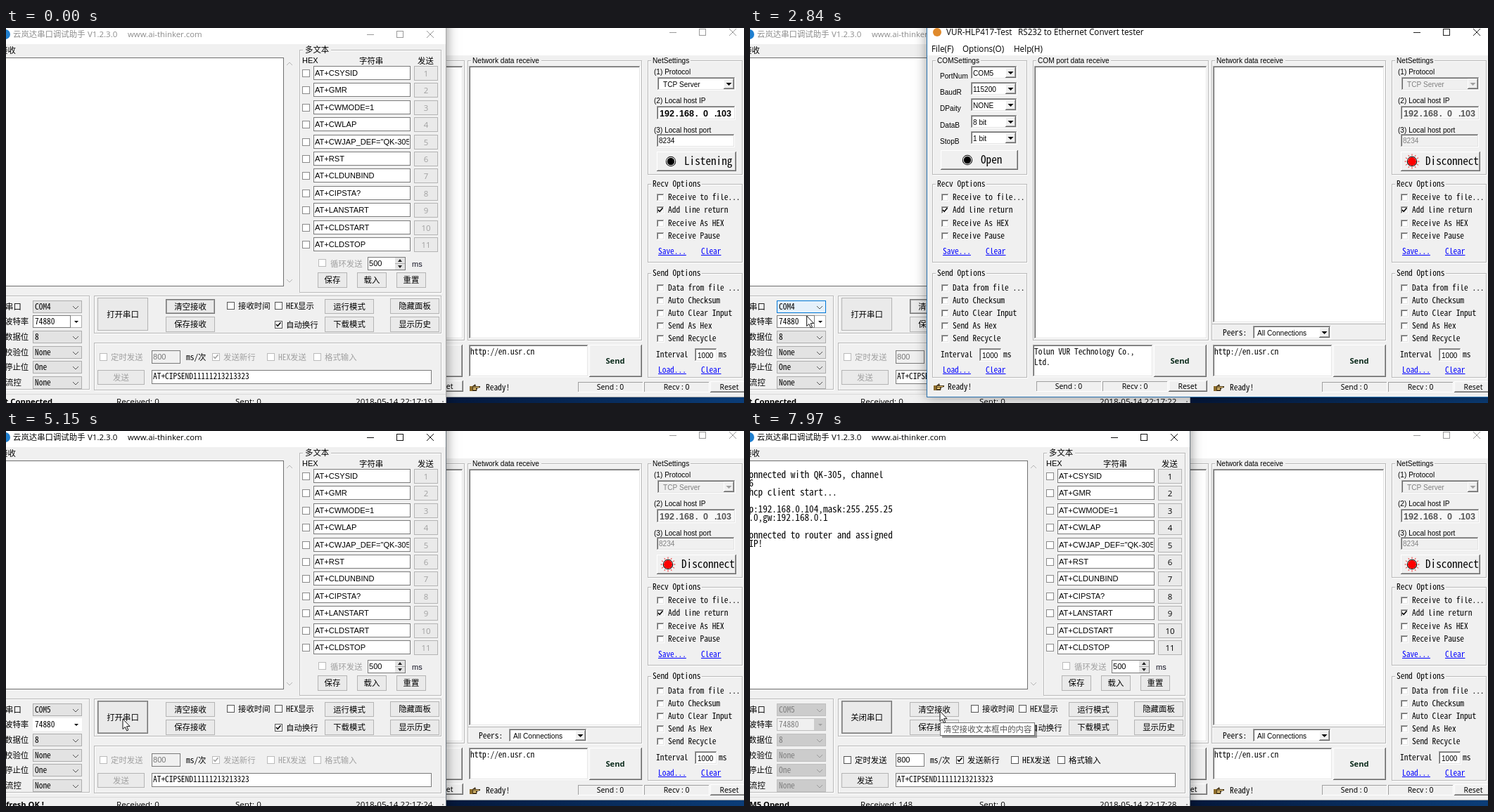
An HTML page with a canvas for the animation above (8000 ms loop, 1049 px wide and 534 px high).

```html
<!DOCTYPE html>
<html lang="en">
<head>
<meta charset="utf-8">
<title>Serial and network test</title>
<style>
html, body { margin: 0; width: 100%; height: 100%; overflow: hidden; background: #f0f0f0; }
canvas { display: block; }
</style>
</head>
<body>
<canvas id="stage" width="1049" height="534"></canvas>
<script>
const ctx = document.getElementById('stage').getContext('2d');
const LOOP = 8000, GRAY = '#f0f0f0', DIM = '#a0a0a0', BLUE = '#0078d7';
const F = {
  ui: '"Open Sans", "Noto Sans CJK SC", sans-serif',
  sans: '"Liberation Sans", Arial, sans-serif',
  noto: '"Noto Sans", sans-serif',
  mono: '"Noto Sans Mono CJK SC", "Noto Sans CJK SC", monospace'
};

// Basic drawing
function rect(x, y, w, h, c) { ctx.fillStyle = c; ctx.fillRect(x, y, w, h); }

function frame(x, y, w, h, c) {
  ctx.strokeStyle = c; ctx.lineWidth = 1;
  ctx.strokeRect(x + .5, y + .5, w - 1, h - 1);
}

function text(s, x, y, font = 'mono', size = 11.4, color = '#000', align = 'left', weight = '') {
  ctx.font = `${weight} ${size}px ${F[font]}`;
  ctx.fillStyle = color; ctx.textAlign = align;
  ctx.fillText(s, x, y + size * .36);
}
const sans = (s, x, y, c, size = 10.1) => text(s, x, y, 'sans', size, c);

function line(points, color, width = 1) {
  ctx.beginPath();
  points.forEach(([x, y], i) => i ? ctx.lineTo(x, y) : ctx.moveTo(x, y));
  ctx.strokeStyle = color; ctx.lineWidth = width; ctx.stroke();
}

function poly(points, color) {
  ctx.beginPath();
  points.forEach(([x, y]) => ctx.lineTo(x, y));
  ctx.closePath(); ctx.fillStyle = color; ctx.fill();
}

function disc(x, y, r, color) {
  ctx.beginPath(); ctx.arc(x, y, r, 0, 7); ctx.fillStyle = color; ctx.fill();
}

function bevel(x, y, w, h, fill, light, dark) {
  rect(x, y, w, h, fill);
  rect(x, y, w, 1, light); rect(x, y, 1, h, light);
  rect(x, y + h - 1, w, 1, dark); rect(x + w - 1, y, 1, h, dark);
}
function sunk(x, y, w, h, fill = '#fff') {
  bevel(x, y, w, h, fill, '#a0a0a0', '#fff');
  bevel(x + 1, y + 1, w - 2, h - 2, fill, '#696969', '#e3e3e3');
}
function raised(x, y, w, h) {
  bevel(x, y, w, h, GRAY, '#fff', '#696969');
  rect(x + 1, y + h - 2, w - 2, 1, '#a0a0a0');
  rect(x + w - 2, y + 1, 1, h - 2, '#a0a0a0');
}

function group(x, y, w, h, label, font = 'mono', size = 11.4, gap = 72) {
  frame(x + 1, y + 1, w, h, '#fff');
  frame(x, y, w, h, '#b8b8b8');
  if (!label) return;
  rect(x + 5, y - 1, gap, 4, GRAY);
  text(label, x + 7, y, font, size);
}

function tick(x, y, c) { line([[x + 2, y + 5], [x + 4.2, y + 7.3], [x + 8.5, y + 2.3]], c, 1.6); }

function captions(xs, y, c) {
  const [a, b, d] = xs;
  line([[a, y + .5], [a + 10, y + .5]], c);
  frame(b, y - 5, 10, 10, c);
  line([[d, y - 5], [d + 10, y + 5]], c);
  line([[d + 10, y - 5], [d, y + 5]], c);
}

// Network test window
function drop(x, y, w, h, label, off, marked) {
  sunk(x, y, w, h, off ? GRAY : '#fff');
  raised(x + w - 17, y + 2, 15, h - 4);
  const ax = x + w - 9.5, ay = y + h / 2 - 1.5;
  poly([[ax - 4, ay], [ax + 4, ay], [ax, ay + 4]], off ? DIM : '#000');
  if (marked) rect(x + 2, y + 2, w - 20, h - 4, BLUE);
  return marked ? '#fff' : off ? '#808080' : '#000';
}

function classicCheck(x, y, label, on) {
  sunk(x, y - 5, 11, 11);
  if (on) tick(x, y - 5, '#000');
  text(label, x + 16, y);
}

function link(s, x, y) {
  text(s, x, y, 'mono', 11.4, '#00f');
  rect(x, y + 5, s.length * 5.7, 1, '#00f');
}

function options(dx) {
  group(259 + dx, 222, 135, 112, 'Recv Options');
  ['Receive to file...', 'Add line return', 'Receive As HEX', 'Receive Pause']
    .forEach((s, i) => classicCheck(272 + dx, 241 + i * 18.6 | 0, s, i === 1));
  link('Save...', 274 + dx, 318); link('Clear', 335 + dx, 318);
  group(259 + dx, 349, 135, 149, 'Send Options');
  ['Data from file ...', 'Auto Checksum', 'Auto Clear Input', 'Send As Hex', 'Send Recycle']
    .forEach((s, i) => classicCheck(272 + dx, 370 + i * 18.1 | 0, s));
  text('Interval', 271 + dx, 465);
  sunk(326 + dx, 456, 32, 19); sans('1000', 330 + dx, 466);
  text('ms', 360 + dx, 465);
  link('Load...', 274 + dx, 487); link('Clear', 335 + dx, 487);
}

function hand(x, y) {
  rect(x, y - 2, 4, 7, '#8a6a2a');
  poly([[x + 4, y - 2], [x + 8, y - 5], [x + 9, y - 2], [x + 15, y - 2], [x + 15, y], [x + 11, y + 1], [x + 10, y + 5], [x + 4, y + 5]], '#4a3a20');
  rect(x + 5, y - 1, 8, 1, '#f6d27a');
  rect(x + 5, y + 1, 4, 2, '#f6d27a');
}

function footer(x, px, y, status) {
  hand(x, y + 1);
  text(status, x + (px > 700 ? 23 : 20), y + 1);
  ['Send : 0', 'Recv : 0'].forEach((s, i) => {
    bevel(px + i * 94, y - 7, 93, 15, GRAY, '#a0a0a0', '#fff');
    text(s, px + i * 94 + 46, y, 'noto', 10.4, '#000', 'center');
  });
  raised(px + 188, y - 8, 55, 16);
  text('Reset', px + 215, y, 'noto', 10.4, '#000', 'center');
}

function sendBox(x, w, lines) {
  sunk(x, 451, w, 46);
  lines.forEach((s, i) => text(s, x + 2, 461 + i * 15));
  raised(x + w + 1, 451, 75, 46);
  text('Send', x + w + 38, 474, 'noto', 11.2, '#0c2b1c', 'center', 'bold');
}

function lamp(x, y, on) {
  if (on) {
    for (let i = 0; i < 12; i++) {
      const a = i * Math.PI / 6, c = Math.cos(a), s = Math.sin(a);
      line([[x + 8 * c, y + 8 * s], [x + 10.5 * c, y + 10.5 * s]], '#e33');
    }
  }
  disc(x, y, 7.2, '#000'); disc(x, y, 6.2, '#fff'); disc(x, y, on ? 6 : 5.2, on ? '#f00' : '#000');
}

function netSettings(s) {
  const off = s.on, c = off ? '#808080' : '#000';
  group(912, 46, 135, 163, 'NetSettings', 'sans', 10.1, 56);
  sans('(1) Protocol', 921, 62);
  sans('TCP Server', 934, 80, drop(926, 70, 111, 19, '', off, s.front && !off));
  sans('(2) Local host IP', 921, 103);
  sunk(925, 111, 112, 20, off ? '#f7f7f7' : '#fff');
  [['192', 929], ['.', 952], ['168', 957], ['.', 980], ['0', 991], ['.', 1007], ['103', 1010]]
    .forEach(([v, x]) => text(v, x, 121.5, 'sans', 12.6, off ? '#555' : '#000', 'left', 'bold'));
  sans('(3) Local host port', 921, 145);
  sunk(925, 151, 111, 19, off ? GRAY : '#fff');
  sans('8234', 928, 160.5, c);
  const p = s.pressed ? 1 : 0;
  if (p) sunk(925, 176, 113, 28, GRAY); else raised(925, 176, 113, 28);
  lamp(off ? 941 : 945 + p, 190 + p, off);
  text(off ? 'Disconnect' : 'Listening', off ? 960 : 964 + p, 190 + p, 'mono', 15.2);
}

function netWindow(s) {
  const ink = s.front ? '#000' : DIM;
  ctx.save();
  if (s.front) { ctx.shadowColor = 'rgba(0,0,0,.4)'; ctx.shadowBlur = 16; }
  rect(251, -20, 830, 546, s.front ? '#2a73b0' : '#9aa0a6');
  ctx.restore();
  rect(252, 0, 830, 525, GRAY);
  rect(252, 0, 830, 39, '#fff');
  disc(266, 6, 6, '#e08a2c');
  text('VUR-HLP417-Test', 279, 6, 'ui', 11.7, ink);
  text('RS232 to Ethernet Convert tester', 381, 6, 'ui', 11.7, ink);
  captions([943, 985, 1028], 6, s.front ? '#222' : '#999');
  text('File(F)', 258, 30, 'ui', 11.7);
  text('Options(O)', 302, 30, 'ui', 11.7);
  text('Help(H)', 375, 30, 'ui', 11.7);

  group(259, 46, 135, 163, 'COMSettings', 'sans', 10.1, 64);
  [['PortNum', 'COM5'], ['BaudR', '115200'], ['DPaity', 'NONE'], ['DataB', '8 bit'], ['StopB', '1 bit']]
    .forEach(([label, value], i) => {
      const y = 64 + i * 23.4 | 0;
      sans(label, 270, y + 4);
      sans(value, 317, y, drop(314, y - 10, 66, 19));
    });
  raised(271, 174, 110, 28);
  lamp(309, 188); text('Open', 328, 188, 'mono', 15.2);

  group(402, 46, 250, 399, 'COM port data receive', 'sans', 10.1, 106);
  sunk(404, 54, 246, 389);
  group(656, 46, 248, 399, 'Network data receive', 'sans', 10.1, 100);
  sunk(658, 54, 244, s.on ? 366 : 389);
  if (s.on) {
    rect(656, 421, 248, 1, '#b8b8b8');
    text('Peers:', 672, 434);
    sans('All Connections', 721, 434, drop(715, 424, 111, 19));
  }
  netSettings(s);
  options(0); options(653);
  sendBox(402, 171, ['Tolun VUR Technology Co.,', 'Ltd.']);
  sendBox(658, 170, ['http://en.usr.cn']);
  footer(261, 407, 510, s.status);
  footer(659, 813, 511, s.status);
}

// Serial window
function btn(x, y, w, h, label, o = {}) {
  rect(x, y, w, h, '#eaeaea');
  frame(x, y, w, h, o.focus ? '#767676' : '#b4b4b4');
  if (o.focus) frame(x + 1, y + 1, w - 2, h - 2, '#a8a8a8');
  text(label, x + w / 2, y + h / 2, o.font || 'mono', 11.4, o.dim ? DIM : '#000', 'center');
}

function check(x, y, label, on, dim) {
  rect(x, y - 5, 11, 11, '#fff');
  frame(x, y - 5, 11, 11, dim ? '#bbb' : '#555');
  if (on) tick(x, y - 5, dim ? DIM : '#000');
  if (label) text(label, x + 16, y + .5, 'mono', 11.4, dim ? DIM : '#000');
}

function chevron(x, y, c, dir = 1) { line([[x - 4, y - 2 * dir], [x, y + 2 * dir], [x + 4, y - 2 * dir]], c); }

function field(x, y, w, h, s, font, size, fill = '#fff', color = '#000') {
  rect(x, y, w, h, fill); frame(x, y, w, h, '#7a7a7a');
  ctx.save();
  ctx.beginPath(); ctx.rect(x, y, w - 2, h); ctx.clip();
  text(s, x + 2, y + h / 2 - (font === 'mono' ? 1.5 : 0), font, size, color);
  ctx.restore();
}

function portCombos(s) {
  const labels = ['串口', '波特率', '数据位', '校验位', '停止位', '流控'];
  [s.port, '74880', '8', 'None', 'One', 'None'].forEach((v, i) => {
    const y = 397 + i * 21.7 | 0, edit = i === 1, hot = i === 0 && s.comHot;
    text(labels[i], i % 5 ? -2 : -1, y - .5);
    const fill = s.open ? '#ccc' : hot ? '#e5f1fb' : edit ? '#fff' : '#e3e3e3';
    rect(38, y - 9, 70, 18, fill);
    if (edit && s.open) rect(39, y - 8, 52, 16, GRAY);
    if (!edit || !s.flatBaud || s.open) frame(38, y - 9, 70, 18, s.open ? '#bfbfbf' : hot ? BLUE : '#adadad');
    if (edit && !s.flatBaud) { rect(91, y - 9, 1, 18, '#adadad'); frame(38, y - 9, 54, 18, '#7a7a7a'); }
    if (edit) poly([[97, y - 1], [103, y - 1], [100, y + 2]], s.open ? DIM : '#000');
    else chevron(99, y + 1, s.open ? '#999' : '#555');
    text(v, 41, y, 'mono', 11.4, s.open ? '#7d7d7d' : '#000');
  });
  if (!s.list) return;
  rect(38, 407, 70, 29, '#fff'); frame(38, 407, 70, 29, BLUE);
  const pick = s.cursor[1] > 420 ? 1 : 0;
  rect(39, 408 + pick * 14, 68, 13, BLUE);
  ['COM4', 'COM5'].forEach((v, i) => text(v, 41, 414 + i * 14, 'mono', 11.4, i === pick ? '#fff' : '#000'));
}

function multiText(s) {
  group(417, 31, 202, 346);
  rect(422, 29, 40, 5, GRAY);
  text('多文本', 425, 31);
  sans('HEX', 421, 46, '#000', 11);
  text('字符串', 502, 46.5); text('发送', 585, 46.5);
  ['CSYSID', 'GMR', 'CWMODE=1', 'CWLAP', 'CWJAP_DEF="QK-305"', 'RST', 'CLDUNBIND', 'CIPSTA?', 'LANSTART', 'CLDSTART', 'CLDSTOP']
    .forEach((cmd, i) => {
      const y = Math.round(64 + i * 24.4);
      rect(421, y - 5, 11, 11, '#fff'); frame(421, y - 5, 11, 11, '#8a8a8a');
      field(437, y - 10, 138, 20, 'AT+' + cmd, 'sans', 11.1);
      btn(580, y - 10, 34, 21, i + 1, { font: 'ui', dim: !s.open });
    });
  check(444, 334, '', false, true);
  text('循环发送', 461, 336, 'mono', 11.4, DIM);
  field(514, 326, 54, 19, '500', 'sans', 11.1);
  rect(553, 327, 14, 17, '#e3e3e3');
  rect(553, 335, 14, 1, '#adadad');
  poly([[557, 333], [563, 333], [560, 329]], '#222');
  poly([[557, 338], [563, 338], [560, 342]], '#222');
  sans('ms', 577, 336, '#112', 11);
  ['保存', '载入', '重置'].forEach((v, i) => btn(443 + i * 56, 348, 42, 22, v));
}

function serialWindow(s) {
  const active = !s.front && s.raised, ink = active ? '#000' : '#8c8c8c';
  ctx.save();
  if (!s.front) { ctx.shadowColor = 'rgba(0,0,0,.45)'; ctx.shadowBlur = 16; }
  rect(-40, -20, 666, 620, active ? '#6d7780' : '#a6a6a6');
  ctx.restore();
  rect(0, 0, 625, 534, GRAY);
  rect(0, 0, 625, 23, '#fff');
  disc(-1, 9, 7, '#1f7fd0');
  text('云岚达串口调试助手', 10, 9, 'ui', 11.4, ink);
  text('V1.2.3.0', 116, 9, 'ui', 11.5, ink);
  text('www.ai-thinker.com', 173, 9, 'ui', 11.4, ink);
  captions([513, 555, 598], 9, active ? '#111' : '#999');

  text('接收', 14, 32, 'mono', 11.4, '#000', 'right');
  rect(-5, 42, 400, 326, '#fff'); frame(-5, 42, 400, 326, '#707070');
  chevron(403, 51, '#b5b5b5', -1); chevron(403, 360, '#b5b5b5');
  const log = ['connected with QK-305, channel', ' 6', 'dhcp client start...', '', 'ip:192.168.0.104,mask:255.255.25', '5.0,gw:192.168.0.1', '', 'connected to router and assigned', ' IP!'];
  log.slice(0, s.lines).forEach((v, i) => text(v, -8.2, 62.5 + i * 12.2, 'mono', 13.2));
  multiText(s);

  group(-9, 381, 128, 134);
  group(125, 381, 494, 54);
  group(125, 448, 494, 68);
  btn(130, 384, 72, 47, s.open ? '关闭串口' : '打开串口', { focus: s.openHot });
  btn(227, 386, 70, 21, '清空接收', { focus: !s.raised });
  btn(227, 411, 70, 22, '保存接收');
  btn(453, 386, 70, 21, '运行模式');
  btn(453, 411, 70, 22, '下载模式');
  btn(546, 385, 70, 22, '隐藏面板');
  btn(546, 411, 70, 22, '显示历史');
  check(314, 395, '接收时间'); check(382, 395, 'HEX显示'); check(382, 422, '自动换行', true);

  const dim = !s.open;
  check(133, 468, '定时发送', false, dim);
  field(207, 459, 41, 19, '800', 'sans', 11.1, dim ? GRAY : '#fff', dim ? '#777' : '#000');
  text('ms/次', 256, 469);
  check(293, 468, '发送新行', true, dim);
  check(371, 468, 'HEX发送', false, dim);
  check(437, 468, '格式输入', false, dim);
  btn(130, 487, 67, 21, '发送', { dim });
  field(207, 487, 398, 20, 'AT+CIPSEND11111213213323', 'mono', 11.4);
  portCombos(s);

  rect(0, 521, 625, 1, '#d9d9d9');
  text(s.note, s.noteEnd, 532, 'ui', 11.2, '#000', 'right', 'bold');
  text('Received: ' + s.received, 157, 532, 'ui', 11.6);
  text('Sent: 0', 326, 532, 'ui', 11.6);
  text('2018-05-14 22:17:' + s.sec, 497, 532, 'ui', 11.6);
  rect(620, 531, 2, 2, '#999');
}

// Overlays
function tooltip(alpha) {
  if (!alpha) return;
  ctx.save();
  ctx.globalAlpha = alpha;
  rect(273, 418, 135, 19, 'rgba(0,0,0,.35)');
  rect(270, 415, 135, 19, '#fff'); frame(270, 415, 135, 19, '#767676');
  text('清空接收文本框中的内容', 275, 424.5, 'mono', 11.4, '#555');
  ctx.restore();
}

function arrow([x, y]) {
  const pts = [[0, 0], [0, 14.5], [3.3, 11.5], [5.7, 16.8], [7.8, 15.8], [5.5, 10.7], [10, 10.5], [0, 0]]
    .map(([a, b]) => [x + a, y + b]);
  poly(pts, '#fff'); line(pts, '#111');
}

// Timeline
const PATH = [
  [450, 1002, 525], [825, 988, 193], [1125, 988, 193], [1725, 812, 408], [1875, 805, 424],
  [1950, 789, 444], [2250, 540, 455], [2625, 74, 430], [2850, 84, 400], [3000, 110, 400],
  [3225, 135, 404], [3375, 140, 406], [3675, 101, 391], [3900, 101, 391], [4200, 76, 426],
  [4500, 76, 426], [4875, 166, 410], [5400, 166, 410], [5925, 271, 402], [6000, 270, 399], [LOOP, 270, 399]
];
const TICKS = [70, 970, 1900, 2920, 3980, 6000, 6300, 6500, 7970];
const CLICKS = [[820, 970], [3760, 3910], [4400, 4480], [5220, 5380]];

function cursorAt(t) {
  t = Math.floor((t + 5) / 75) * 75;
  const i = PATH.findIndex(p => p[0] > t);
  if (i < 1) return i ? PATH[PATH.length - 1].slice(1) : null;
  const [t0, x0, y0] = PATH[i - 1], [t1, x1, y1] = PATH[i];
  const k = (t - t0) / (t1 - t0);
  return [x0 + (x1 - x0) * k, y0 + (y1 - y0) * k];
}

function stateAt(t) {
  const within = (a, b) => t >= a && t < b;
  const open = t >= 6000, refreshed = t >= 3910;
  return {
    front: within(820, 3840), raised: t >= 3840, on: t >= 970, pressed: within(820, 970),
    status: within(820, 1290) ? 'NetSettings' : 'Ready!',
    open, port: t >= 4480 ? 'COM5' : 'COM4', list: within(3910, 4480),
    comHot: within(2840, 2920) || within(3600, 4480), flatBaud: t >= 2920,
    openHot: within(3230, 3530) || t >= 4700,
    note: open ? 'COM5 Opend' : refreshed ? 'Refresh OK !' : 'Not Connected',
    noteEnd: open ? 56 : refreshed ? 54 : 66,
    received: t >= 7970 ? 148 : t >= 7350 ? 57 : 0,
    lines: t >= 7970 ? 9 : t >= 7350 ? 3 : 0,
    sec: 19 + TICKS.filter(v => t >= v).length,
    tip: t >= 6710 ? 1 : t >= 6640 ? .6 : t >= 6560 ? .18 : 0,
    click: CLICKS.some(([a, b]) => within(a, b)),
    cursor: cursorAt(t)
  };
}

function draw(t) {
  const s = stateAt(t);
  const sky = ctx.createLinearGradient(625, 0, 1049, 0);
  sky.addColorStop(0, '#04173a'); sky.addColorStop(1, '#0b3d78');
  rect(0, 0, 1049, 534, sky);
  const order = s.front ? [serialWindow, netWindow] : [netWindow, serialWindow];
  order.forEach(paint => paint(s));
  tooltip(s.tip);
  if (!s.cursor) return;
  if (s.click) disc(s.cursor[0], s.cursor[1], 11, 'rgba(240,125,90,.75)');
  arrow(s.cursor);
}

const start = performance.now();
function tickFrame() {
  draw((performance.now() - start) % LOOP);
  requestAnimationFrame(tickFrame);
}
tickFrame();
</script>
</body>
</html>
```
